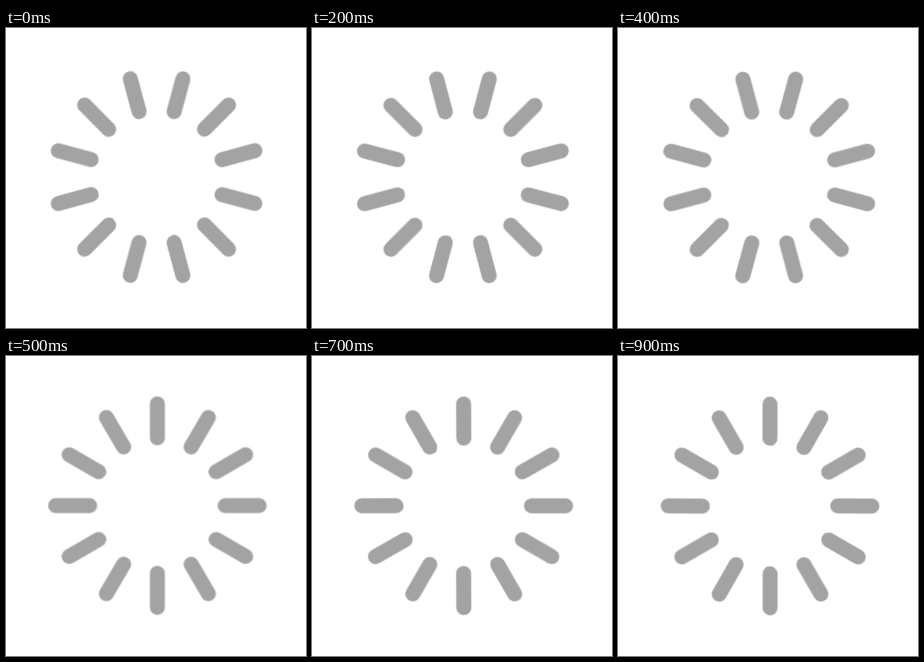
Recreate the animation shown at these times as an HTML page. Size 300 by 300 pixels, loop 1 s.

```html
<!DOCTYPE html>
<html lang="en">
<head>
<meta charset="utf-8">
<title>Loading spinner</title>
<style>
  html, body { margin: 0; width: 100%; height: 100%; overflow: hidden; background: #fff; }
  svg { display: block; width: 100%; height: 100%; }
  line { stroke: #a3a3a3; stroke-width: 15; stroke-linecap: round; }
  /* turns one half-gap per step while the hub drifts slightly */
  .wheel { animation: turn 1s steps(10) infinite; }
  @keyframes turn {
    from { transform: translate(150.6px, 149.1px) rotate(15deg); }
    to { transform: translate(152.2px, 150.1px) rotate(165deg); }
  }
</style>
</head>
<body>
<svg viewBox="0 0 300 300" aria-label="Loading">
  <defs>
    <g id="pair">
      <line y1="-101.8" y2="-67.7"/>
      <line y1="67.7" y2="101.8"/>
    </g>
    <g id="trio">
      <use href="#pair"/>
      <use href="#pair" transform="rotate(30)"/>
      <use href="#pair" transform="rotate(60)"/>
    </g>
  </defs>
  <g class="wheel">
    <use href="#trio"/>
    <use href="#trio" transform="rotate(90)"/>
  </g>
</svg>
</body>
</html>
```
